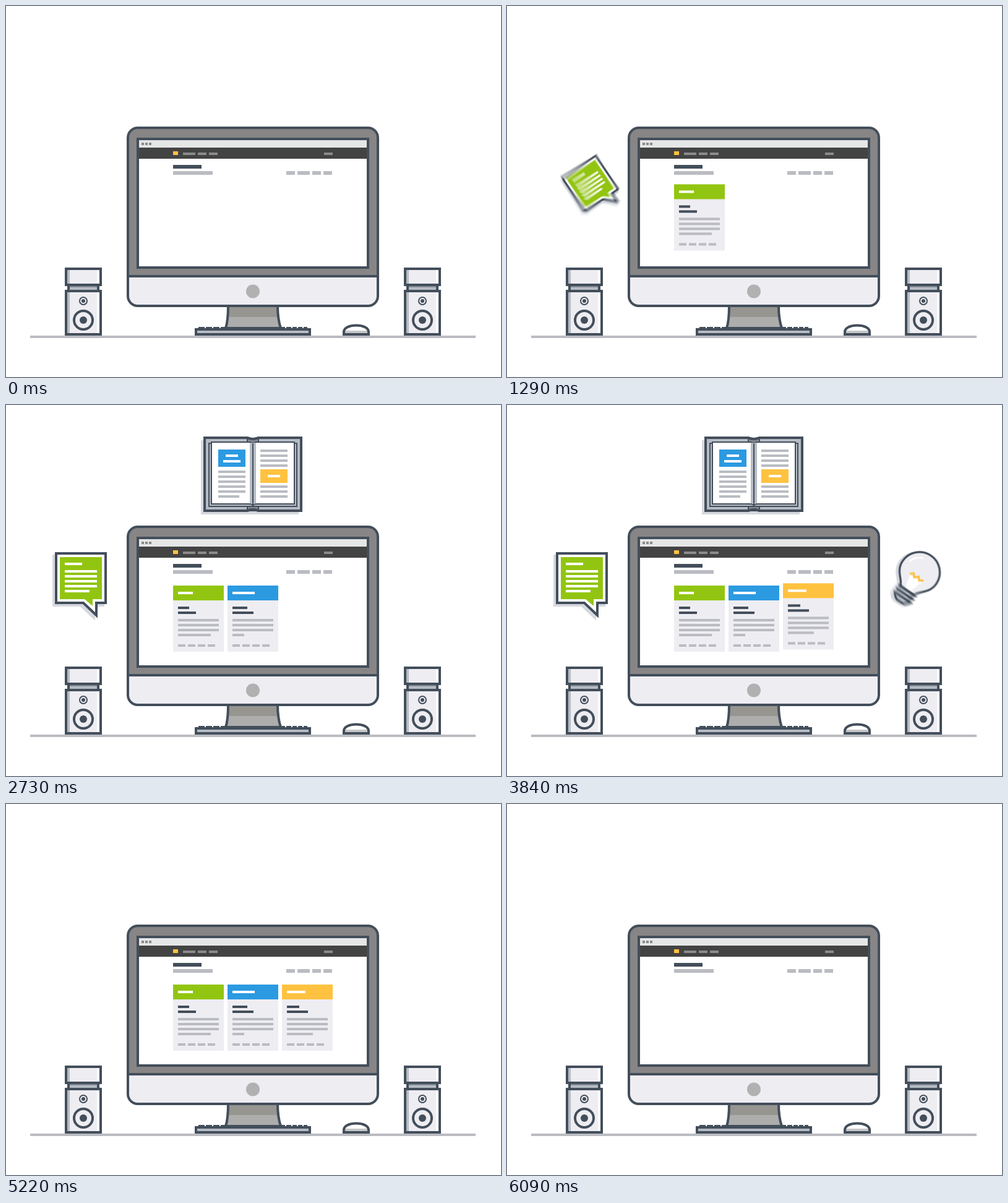
Animation of 800x600 px, one loop 6300 ms. Source, as an HTML page with a canvas:

```html
<!DOCTYPE html>
<html lang="en">
<head>
<meta charset="utf-8">
<title>Desk</title>
<style>
html, body { margin: 0; width: 100%; height: 100%; overflow: hidden; background: #fff; }
canvas { display: block; }
</style>
</head>
<body>
<canvas id="stage" width="800" height="600"></canvas>
<script>
const LOOP = 6300, STEP = 30, SHUTTER = 15, SAMPLES = 10;
const DARK = '#434e5b', GRAY = '#babcc2', LIGHT = '#eeedf2', SHADE = '#d5d8de', STEEL = '#b6bcc4';
const GREEN = '#92c511', BLUE = '#2c9ae1', YELLOW = '#ffc240', WHITE = '#fff';

const view = document.getElementById('stage').getContext('2d');
const scene = document.createElement('canvas');
scene.width = 800;
scene.height = 600;
const g = scene.getContext('2d');

const clamp = x => Math.max(0, Math.min(1, x));
const ease = x => (1 - Math.cos(Math.PI * clamp(x))) / 2;

function box(color, x, y, w, h) {
  g.fillStyle = color;
  g.fillRect(x, y, w, h);
}

function bars(color, xs, y, h) {
  for (const [x, w] of xs) box(color, x, y, w, h);
}

function lines(color, x, y, w, count, gap = 8) {
  for (let i = 0; i < count; i++) box(color, x, y + i * gap, w, 4);
}

function frame(x, y, w, h, width = 4) {
  g.strokeStyle = DARK;
  g.lineWidth = width;
  g.strokeRect(x, y, w, h);
}

function shape(path, fill, stroke, width = 4) {
  if (fill) {
    g.fillStyle = fill;
    g.fill(path);
  }
  if (stroke) {
    g.strokeStyle = stroke;
    g.lineWidth = width;
    g.stroke(path);
  }
}

function disc(x, y, r, fill, stroke, width) {
  const path = new Path2D();
  path.arc(x, y, r, 0, Math.PI * 2);
  shape(path, fill, stroke, width);
}

function dropShadow(path) {
  g.save();
  g.translate(-4, 4);
  shape(path, SHADE, SHADE);
  g.restore();
}

// Items that pop out from behind the monitor
const bubblePath = new Path2D('M81 240H161V320H146V340L125 320H81Z');
const bubbleFace = new Path2D('M87 246H155V314H140V325L127 314H87Z');

function drawBubble() {
  dropShadow(bubblePath);
  shape(bubblePath, WHITE, DARK);
  shape(bubbleFace, GREEN);
  box(WHITE, 95, 255, 28, 4);
  lines(WHITE, 95, 267, 52, 4);
  box(WHITE, 95, 299, 40, 4);
}

const cover = new Path2D('M321 53H390Q399 57 408 53H477V171H408Q399 167 390 171H321Z');
const pages = new Path2D('M332 60H392Q399 60 399 64Q399 60 406 60H466V160H406Q399 160 399 163Q399 160 392 160H332Z');

function drawBook() {
  box(SHADE, 315, 57, 158, 120);
  shape(cover, STEEL, DARK);
  frame(328, 62, 142, 102, 2);
  for (const y of [54, 164]) {
    box('#868b93', 390, y, 18, 7);
    frame(390, y, 18, 7, 2);
  }
  shape(cover, null, DARK);
  shape(pages, WHITE, DARK, 2);
  box(STEEL, 394, 61, 10, 98);
  box(DARK, 398, 62, 2, 101);

  box(BLUE, 343, 72, 44, 28);
  box(WHITE, 355, 80, 20, 4);
  box(WHITE, 351, 89, 28, 4);
  lines(GRAY, 343, 106, 44, 5);
  box(GRAY, 343, 146, 34, 4);

  lines(GRAY, 411, 72, 44, 4);
  box(YELLOW, 411, 104, 44, 22);
  box(WHITE, 423, 113, 20, 4);
  lines(GRAY, 411, 130, 44, 3);
}

const glass = new Path2D('M648 318C648 307 625 300 625 275A40.5 40.5 0 0 1 706 275C706 300 683 307 683 318Z');
const screwBase = new Path2D('M646 318H685V337L676 345H655L646 337Z');
const filament = new Path2D('M651 288L657 283L662 289L669 283L674 289L681 284');

function drawBulb() {
  dropShadow(glass);
  dropShadow(screwBase);
  shape(glass, LIGHT, DARK);
  shape(new Path2D('M652 289L680 289L673 316H658Z'), WHITE);
  shape(new Path2D('M637 268A29 29 0 0 1 657 247'), null, WHITE);
  shape(filament, null, YELLOW);
  shape(screwBase, STEEL);
  box('#8b919a', 675, 318, 9, 20);
  g.lineCap = 'round';
  for (let i = 0; i < 3; i++) {
    shape(new Path2D(`M646 ${319 + i * 8}H685`), null, DARK);
  }
  shape(new Path2D('M648 337L656 345H675L683 337'), null, DARK);
  g.lineCap = 'butt';
}

const items = [
  { draw: drawBubble, start: 990, span: 420, x: 119, y: 291, dx: 102, dy: 24, turn: -Math.PI },
  { draw: drawBook, start: 2280, span: 450, x: 397, y: 113, dx: 2, dy: 100, turn: 0 },
  { draw: drawBulb, start: 3540, span: 420, x: 664, y: 292, dx: -32, dy: -56, turn: Math.PI, pulse: true }
];

function drawItem(item, t) {
  const p = ease((t - item.start) / item.span) * (1 - ease((t - 4830) / 390));
  if (p < 0.002) return;
  const beat = item.pulse ? clamp((t - 3990) / 840) : 0;
  const scale = p * (1 + 0.05 * (1 - Math.cos(beat * 4 * Math.PI)));
  const rest = 1 - p;
  g.save();
  g.translate(item.x + item.dx * rest, item.y + item.dy * rest);
  g.rotate(item.turn * rest);
  g.scale(scale, scale);
  g.translate(-item.x, -item.y);
  item.draw();
  g.restore();
}

// Cards on the page
const cards = [
  { x: 270, color: GREEN, start: 990, label: 24, head: [18, 29], tail: 53 },
  { x: 358, color: BLUE, start: 2280, label: 36, head: [24, 34], tail: 19 },
  { x: 446, color: YELLOW, start: 3540, label: 30, head: [20, 34], tail: 42 }
];

function drawCard(card, t, index) {
  const u = t - card.start;
  const out = clamp((t - 5550 - index * 90) / 360);
  if (u < -60 || out === 1) return;
  const rise = 433 - 145 * ease((u + 90) / 360) + 4 * ease((u - 270) / 150);
  const leave = out < 0.4 ? -9 * ease(out / 0.4) : -9 + 28 * ((out - 0.4) / 0.6) ** 2;
  g.save();
  g.globalAlpha = 1 - clamp((out - 0.4) / 0.6);
  g.translate(card.x, rise + leave);
  box(LIGHT, 0, 24, 82, 83);
  box(card.color, 0, 0, 82, 24);
  box(WHITE, 8, 10, card.label, 4);
  card.head.forEach((w, i) => box(DARK, 8, 34 + i * 8, w, 4));
  lines(GRAY, 8, 54, 66, 3);
  box(GRAY, 8, 78, card.tail, 4);
  for (let i = 0; i < 4; i++) box(GRAY, 8 + i * 16, 95, 12, 4);
  g.restore();
}

// Fixed furniture
function drawSpeaker(x) {
  g.save();
  g.translate(x, 423);
  for (const [y, h] of [[2, 26], [38, 70]]) {
    box(WHITE, 2, y, 56, h);
    box(STEEL, 4, y, 4, h);
    box(LIGHT, 8, y, 44, h);
    frame(2, y, 56, h);
  }
  box(DARK, 4, 30, 52, 6);
  box(STEEL, 8, 30, 44, 6);
  box('#868d97', 8, 30, 44, 2);
  disc(30, 54, 6, LIGHT, DARK, 2);
  disc(30, 54, 3, DARK);
  disc(30, 85, 15, LIGHT, DARK, 4);
  disc(30, 85, 6, DARK);
  g.restore();
}

const stand = new Path2D('M359 485C359 502 358 512 355 521H444C441 512 439 502 439 485Z');
const mouse = new Path2D('M546 531V527C546 513 586 513 586 527V531Z');

function drawDesk() {
  box(GRAY, 39, 533, 720, 4);
  drawSpeaker(95);
  drawSpeaker(643);

  g.save();
  g.clip(stand);
  box('#adadac', 350, 485, 100, 36);
  box('#969590', 350, 485, 100, 18);
  g.restore();
  shape(stand, null, DARK);

  box(STEEL, 307, 523, 184, 8);
  frame(307, 523, 184, 8);
  bars(DARK, [[311, 10], [323, 10], [335, 10], [347, 12], [361, 76], [439, 12],
    [453, 8], [463, 7], [472, 7], [481, 6]], 519, 3);

  shape(mouse, WHITE);
  box('#c6c7c8', 547, 525, 38, 5);
  shape(mouse, null, DARK);
}

const shell = new Path2D();
shell.roundRect(197, 197, 404, 288, 16);

function drawMonitor(t) {
  g.save();
  g.clip(shell);
  box('#878585', 197, 197, 404, 240);
  box(LIGHT, 197, 437, 404, 48);
  box(DARK, 197, 435, 404, 4);
  g.restore();
  shape(shell, null, DARK);
  disc(399, 461.5, 11, '#b1b1b1');

  box(WHITE, 215, 217, 368, 204);
  box('#e5e6e6', 215, 217, 368, 12);
  bars('#8a8a8a', [[219, 4], [225, 4], [231, 4]], 221, 4);
  box('#434343', 215, 229, 368, 18);
  box(YELLOW, 270, 235, 8, 6);
  bars('#8b8b8b', [[286, 20], [310, 14], [328, 14], [514, 14]], 237, 4);
  box(DARK, 270, 257, 46, 6);
  bars(GRAY, [[270, 64], [453, 14], [471, 20], [495, 14], [513, 14]], 267, 6);

  g.save();
  g.beginPath();
  g.rect(215, 247, 368, 174);
  g.clip();
  cards.forEach((card, i) => drawCard(card, t, i));
  g.restore();
  frame(213, 215, 372, 208);
}

function drawScene(t) {
  box(WHITE, 0, 0, 800, 600);
  for (const item of items) drawItem(item, t);
  drawDesk();
  drawMonitor(t);
}

const moves = [[990, 1410], [2280, 2730], [3540, 5220], [5550, 6090]];

// Averages several moments per step for motion blur
function render(t) {
  const moving = moves.some(([from, to]) => t >= from && t < to);
  const count = moving ? SAMPLES : 1;
  for (let i = 0; i < count; i++) {
    drawScene(t + SHUTTER * ((i + 0.5) / count - 0.5));
    view.globalAlpha = 1 / (i + 1);
    view.drawImage(scene, 0, 0);
  }
}

const begin = performance.now();
let shown = -1;

function tick() {
  const elapsed = (performance.now() - begin) % LOOP;
  const t = Math.floor(elapsed / STEP) * STEP;
  if (t !== shown) render(shown = t);
  requestAnimationFrame(tick);
}
tick();
</script>
</body>
</html>
```
